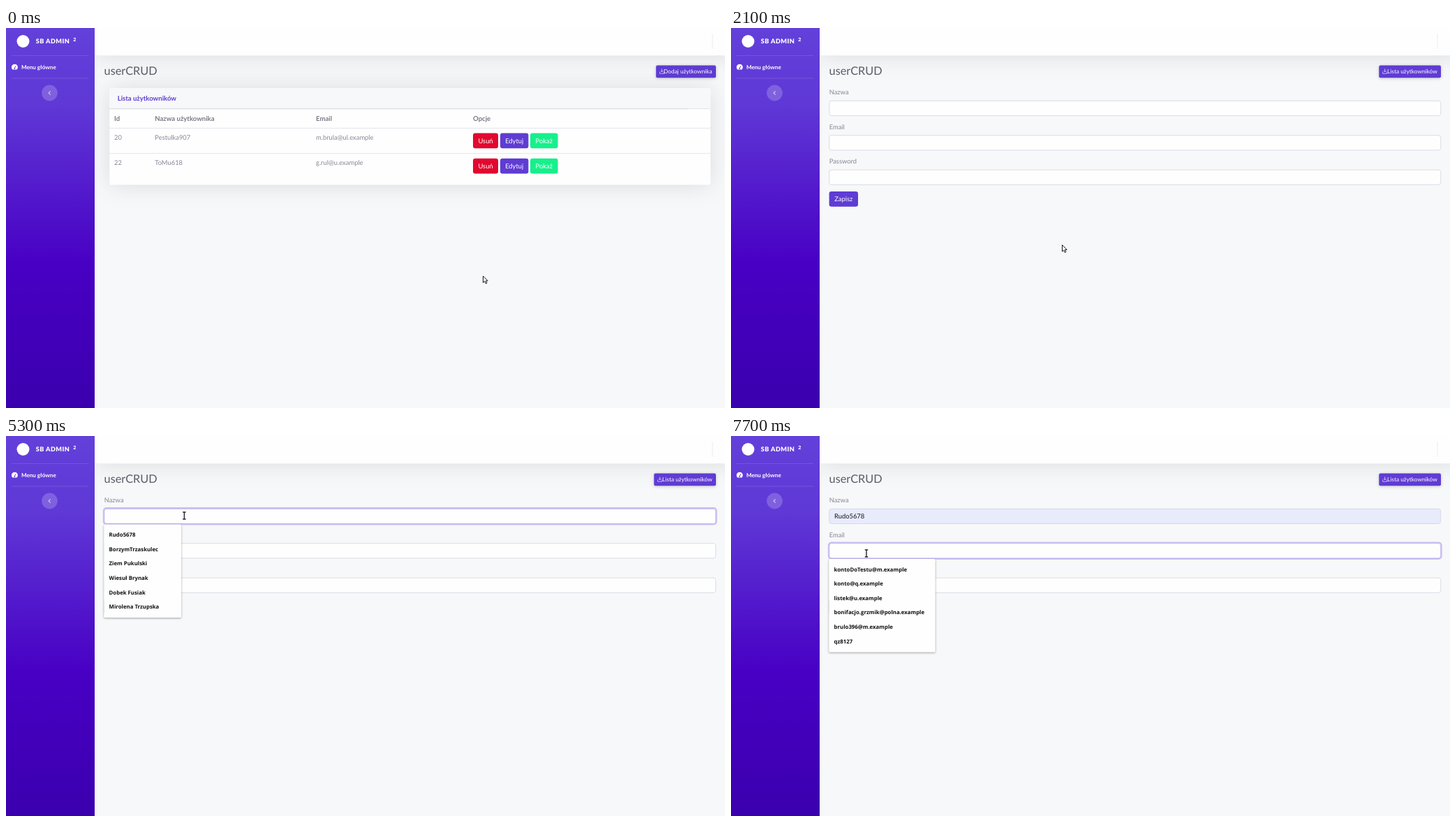
Animation of 1030x544 px, one loop 8000 ms. Source, as an HTML page:

```html
<!DOCTYPE html>
<html lang="pl">
<head>
<meta charset="utf-8">
<title>userCRUD</title>
<style>
  html, body { margin: 0; width: 100%; height: 100%; overflow: hidden; background: #f7f8f9; }
  svg { display: block; width: 100vw; height: 100vh; }
  text { font: 9.4px Lato, "Open Sans", sans-serif; fill: #858796; text-rendering: geometricPrecision; white-space: pre; }
  .bold { font-weight: 700; font-size: 9.55px; fill: #787a85; }
  .title { font-size: 16.3px; fill: #5a5c69; }
  .mid { text-anchor: middle; }
  .end { text-anchor: end; font-size: 8.3px; }
  .light { fill: #fffefe; }
  .ui { font: 700 7.8px "Open Sans", "Noto Sans", sans-serif; fill: #101014; }
  .status { font: 8.75px "Open Sans", "Noto Sans", sans-serif; fill: #303036; }
  .value { fill: #141418; }
  .raised { filter: drop-shadow(0 1.4px 16px rgba(58, 59, 69, .15)); }
  .small-shadow { filter: drop-shadow(0 1px 2px rgba(58, 59, 69, .25)); }
  .popup { filter: drop-shadow(0 1px 1.5px rgba(0, 0, 0, .35)); }
</style>
</head>
<body>
<svg id="stage" viewBox="0 0 1030 544"></svg>
<script>
const LOOP = 8000, STEP = 100;
const PURPLE = '#5f3cd3', HOVER = '#4400bd', RED = '#e2082f', GREEN = '#16f08c', WHITE = '#fffefe';

const text = (x, y, str, cls = '', extra = '') => `<text x="${x}" y="${y}" class="${cls}" ${extra}>${str}</text>`;
const rect = (x, y, w, h, fill, extra = '') =>
  `<rect x="${x}" y="${y}" width="${w}" height="${h}" fill="${fill}" ${extra}/>`;
const line = (d, color, width = .7, extra = '') =>
  `<path d="${d}" fill="none" stroke="${color}" stroke-width="${width}" ${extra}/>`;
const group = (id, body) => `<g id="${id}">${body}</g>`;

const button = (x, y, w, label, fill) =>
  rect(x, y, w, 21.7, fill, 'rx="3.2"') + text(x + w / 2, y + 14.2, label, 'mid light');

// Small button in the page header, with a download icon before its label
const headerButton = (id, x, label) =>
  rect(x, 53.5, 1017 - x, 17.7, PURPLE, `id="${id}" rx="2" class="small-shadow"`) +
  line(`M${x + 8.4} 58.3v4.4m-2-1.8l2 2 2-2M${x + 5.3} 62.6v2.6h6.2v-2.6`, 'rgba(255,255,255,.6)', 1) +
  text(1011.7, 65.2, label, 'end light');

const userRow = (y, id, name, mail) =>
  text(155, y + 16.5, id) + text(213.3, y + 16.5, name) + text(444, y + 16.5, mail) +
  button(669, y + 7, 36, 'Usuń', RED) +
  button(708, y + 7, 40.4, 'Edytuj', PURPLE) +
  button(751, y + 7, 39.6, 'Pokaż', GREEN);

const field = (id, y, label) =>
  text(140.7, y - 8.6, label) +
  rect(139.8, y - .9, 877.9, 23.4, 'none', `id="${id}Glow" rx="4" stroke="#cbc2f4" stroke-width="2"`) +
  rect(140.8, y + .3, 875.9, 21.2, WHITE, `id="${id}Box" rx="3.2" stroke="#d1d3e2" stroke-width=".8"`);

const dropdown = (id, y, w, items) => group(id,
  rect(140.3, y, w, 133.6, WHITE, 'rx="1.5" class="popup"') +
  (id === 'names' ? rect(140.3, y + 4.7, w, 20.7, '#e9e9ec', 'id="highlight"') : '') +
  items.map((item, i) => text(147.6, y + 17.6 + i * 20.65, item, 'ui')).join(''));

const sidebar =
  rect(0, 0, 127, 544, 'url(#side)') +
  '<circle cx="24.5" cy="19" r="9" fill="#fffefe"/>' +
  text(42.8, 22, 'SB ADMIN', 'light', 'style="font-size:9.1px;font-weight:900;letter-spacing:.45px"') +
  text(96.2, 18.8, '2', 'light', 'style="font-size:7px;font-weight:900"') +
  line('M8 39.5H118.5M8 72H118.5', 'rgba(255,255,255,.17)') +
  '<path d="M9.4 59.6A4.5 4.5 0 1 1 15.4 59.6Z" fill="#fffefe"/>' +
  line('M12.3 57.8l1.7-3.6', PURPLE, .9) +
  '<circle cx="12.3" cy="57.7" r="1" fill="#5f3cd3"/>' +
  text(21.9, 58.9, 'Menu główne', 'bold light', 'style="font-size:8.1px;fill:#fffefe"') +
  '<circle cx="62.5" cy="93" r="11.4" fill="rgba(255,255,255,.2)"/>' +
  line('M63.8 90.4l-2.7 2.6 2.7 2.6', 'rgba(255,255,255,.6)', 1.2);

const listPage = group('list',
  headerButton('addButton', 931.2, 'Dodaj użytkownika') +
  rect(148.3, 86, 861, 138.6, WHITE, 'rx="3.2" class="raised"') +
  '<path d="M148.3 115.5V89.2a3.2 3.2 0 0 1 3.2-3.2H1006a3.2 3.2 0 0 1 3.2 3.2V115.5Z" fill="#f7f8f9"/>' +
  text(159.7, 103.6, 'Lista użytkowników', 'bold', `style="fill:${PURPLE}"`) +
  line('M148.3 115.6H1009.2M148.3 143.4H1009.2M148.3 179.6H1009.2', '#e0e2ea', .9) +
  line('M148.3 115.7H977', '#d3d5dd') +
  [[155, 'Id'], [213.3, 'Nazwa użytkownika'], [444, 'Email'], [669, 'Opcje']]
    .map(([x, label]) => text(x, 133, label, 'bold')).join('') +
  userRow(143.6, '20', 'Pestulka907', 'm.brula@ul.example') +
  userRow(179.8, '22', 'ToMu618', 'g.rul@u.example'));

const formPage = group('form',
  headerButton('listButton', 928.3, 'Lista użytkowników') +
  field('name', 104, 'Nazwa') + field('email', 153.4, 'Email') + field('pass', 202.8, 'Password') +
  button(140.6, 234, 41.4, 'Zapisz', PURPLE) +
  text(148, 118, 'Rudo5678', 'value', 'id="nameText"') +
  line('', '#e8262f', .8, 'id="spelling"') +
  line('', '#33333a', .9, 'id="caret"') +
  dropdown('names', 126.4, 110.7, ['Rudo5678', 'BorzymTrzaskulec', 'Ziem Pukulski',
    'Wiesuł Brynak', 'Dobek Fusiak', 'Mirolena Trzupska']) +
  dropdown('emails', 175.9, 152.3, ['kontoDoTestu@m.example', 'konto@q.example', 'listek@u.example',
    'bonifacjo.grzmik@polna.example', 'brulo396@m.example', 'qz8127']));

const overlay =
  group('status',
    '<path d="M0 530H104a2 2 0 0 1 2 2V544H0Z" fill="#f8f8f8" stroke="#c9c9d0" stroke-width=".6"/>' +
    text(2.6, 540.4, 'localhost:8080/user/add', 'status')) +
  group('arrow', '<path d="M.5 .6V10L2.7 8 4.3 11.4 5.9 10.7 4.4 7.4H7.2Z" fill="#fffefe" stroke="#16161a" stroke-width="1" stroke-linejoin="round"/>') +
  group('beam',
    line('M-2.2-5h4.4M-2.2 5h4.4M0-5v10', '#fffefe', 2.4, 'opacity=".6"') +
    line('M-2.2-5h4.4M-2.2 5h4.4M0-5v10', '#25252b', 1.4));

document.getElementById('stage').innerHTML =
  `<defs><linearGradient id="side" x1="0" y1="0" x2="0" y2="1">
    <stop offset="0" stop-color="#6340da"/><stop offset=".2" stop-color="#5f38d6"/>
    <stop offset=".62" stop-color="#4800c4"/><stop offset="1" stop-color="#3b00ae"/>
  </linearGradient></defs>` +
  rect(0, 0, 1030, 544, '#f7f8f9') +
  rect(127, 0, 920, 39.3, WHITE, 'class="raised"') +
  line('M1012 8.5V30', '#e3e6f0') +
  text(140.6, 67.4, 'userCRUD', 'title') +
  listPage + formPage + sidebar + overlay;

const el = id => document.getElementById(id);
const show = (id, on) => { el(id).style.display = on ? '' : 'none'; };
const between = (t, from, to) => t >= from && t < to;

// Pointer places: time, x, y; each is held until the next
const path = [
  [0, 683, 354.5], [400, 726, 310], [500, 812, 222], [600, 912, 119], [700, 963, 66], [800, 969, 60],
  [1200, 1003, 55.5], [1500, 972.6, 60.6], [1600, 900, 97], [1700, 790, 152], [1800, 670, 212],
  [1900, 560, 268], [2000, 495, 300], [2100, 474, 310], [2400, 400, 262], [2500, 335, 216],
  [2700, 275, 146], [2800, 232.5, 110.6], [5100, 236, 111], [5200, 246, 113], [5300, 255.4, 114],
  [5400, 242, 130.4], [5600, 203, 137], [6500, 204, 138], [6600, 206, 139.5], [6700, 207.3, 140.4],
  [6800, 207, 143], [6900, 204, 147], [7000, 200, 157], [7100, 196, 165], [7200, 194, 168]
];
const textPointer = t => between(t, 2800, 5400) || t >= 7000;

const nameEnd = 148 + el('nameText').getComputedTextLength();
el('spelling').setAttribute('d', `M148 119.8H${nameEnd}`);

function caretPath(t) {
  if (between(t, 3400, 3900) || between(t, 4500, 5100)) return 'M148.5 108.3v13';
  if (between(t, 6400, 6900)) return `M${nameEnd + .4} 108.3v13`;
  return between(t, 7200, 7700) ? 'M148.5 158v13' : '';
}

function focus(id, amount) {
  el(id + 'Glow').style.opacity = amount;
  el(id + 'Box').style.stroke = amount ? '#b3a5ec' : '#d1d3e2';
}

function render(time) {
  const t = Math.floor(time % LOOP / STEP) * STEP;
  const onForm = t >= 1700;
  show('list', !onForm);
  show('form', onForm);
  show('status', between(t, 800, 1600));
  el('addButton').style.fill = between(t, 800, 1600) ? HOVER : t === 700 ? '#5120c8' : PURPLE;

  focus('name', t === 3400 || t === 7200 ? .45 : between(t, 3500, 7200) ? 1 : 0);
  focus('email', t === 7200 ? .45 : t > 7200 ? 1 : 0);
  focus('pass', 0);
  el('nameBox').style.fill = t >= 5400 ? '#e8ebfc' : WHITE;
  show('nameText', t >= 5400);
  show('spelling', between(t, 6400, 7200));
  show('names', between(t, 3400, 6400));
  show('highlight', t >= 5400);
  show('emails', t >= 7200);
  el('caret').setAttribute('d', caretPath(t));

  const [, x, y] = path.findLast(p => p[0] <= t);
  const beam = textPointer(t);
  show('beam', beam);
  show('arrow', !beam);
  el(beam ? 'beam' : 'arrow').setAttribute('transform', `translate(${x} ${y})`);
}

const start = performance.now();
function tick() {
  render(performance.now() - start);
  requestAnimationFrame(tick);
}
tick();
</script>
</body>
</html>
```
